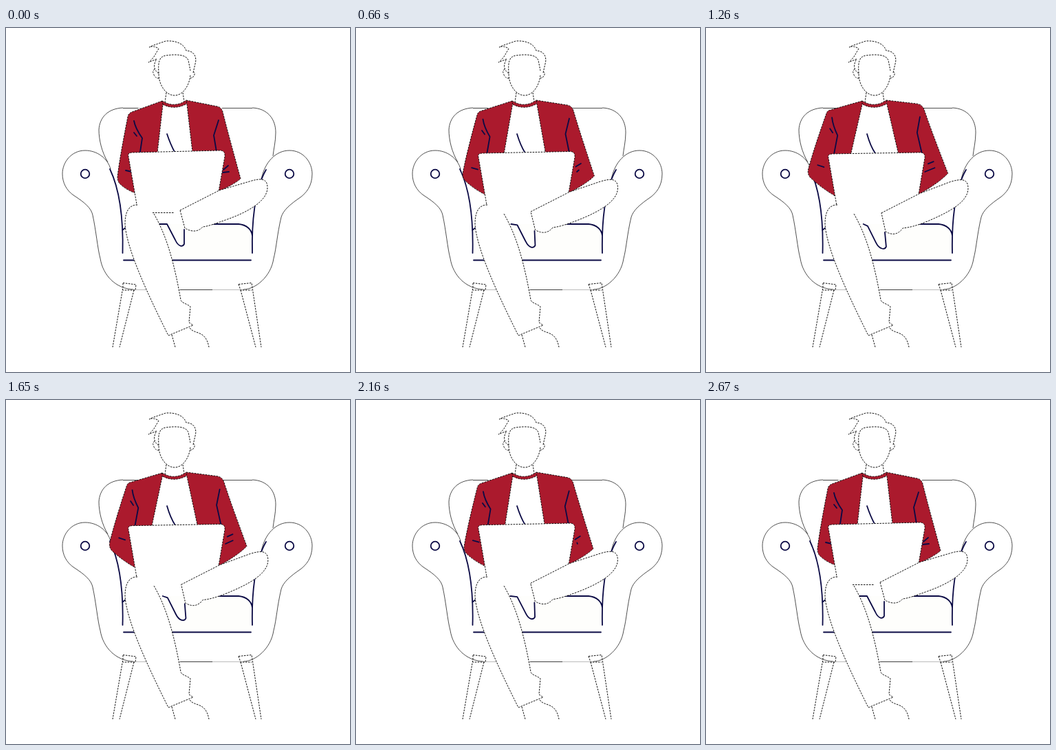
An HTML page that plays this animation: 500 by 500 pixels, repeating every 2.73 s.

```html
<!DOCTYPE html>
<html lang="en">
<head>
<meta charset="utf-8">
<title>Reading in an armchair</title>
<style>
  html, body { margin: 0; width: 100%; height: 100%; overflow: hidden; background: #fff; }
  svg { display: block; width: 100vw; height: 100vh; }
  path { fill: none; }
  .thin { stroke: #222; stroke-width: .8; }
  .faint { stroke: #aaa; stroke-width: .8; }
  .dots { stroke: #111; stroke-width: 1; stroke-dasharray: 2.5 1.5; }
  .navy { stroke: #0b0a45; stroke-width: 1.8; stroke-linecap: round; stroke-linejoin: round; }
  .white { fill: #fff; }
  .red { fill: #ab1a2d; }
  .seat { fill: #fefefc; }
</style>
</head>
<body>
<svg viewBox="0 0 500 500">
  <!-- chair -->
  <path class="thin" d="M148 195C139 180 135 162 135 148C136 130 148 117 170 116M358 116C380 117 392 132 392 152C392 165 389 176 388 186"/>
  <path class="faint" d="M170 116.5H200M185 380.5H345"/>
  <path class="thin" d="M170 116.5H192M314 116.5H358M253 380.5H300"/>
  <path class="thin white" d="M152 205C148 190 133 178 115 178C95 178 82 195 82 212C82 225 88 236 98 243C115 254 124 262 126 272C131 295 133 320 137 335C141 360 160 379 185 380"/>
  <path class="thin white" d="M371 220C376 195 392 178 412 178C432 178 445 195 445 212C445 230 436 240 428 246C412 257 403 265 400 275C394 300 393 320 389 335C385 362 362 380 345 380"/>
  <path class="seat" d="M170 294Q175 285 190 285H338Q355 287 358 302V337H170Z"/>
  <g fill="none" class="navy"><circle cx="115" cy="212" r="6.3"/><circle cx="412" cy="212" r="6.3"/></g>
  <path class="navy" d="M151 205C162 228 171 265 169.500 327M358 327C357 285 361 235 378 206M171 337.500H356M300 285H338C350 286 357 293 358 302M169 294L174 290"/>
  <path class="navy" d="M222 285L234 285L246 308C251 319 257 318 259 314L259 293" data-to="M229 285L235 288L247 312C252 322 260 323 262 318L260 297"/>
  <path class="dots" d="M170 370.500L189 373L188 381H170M170 371V377L155 464M186 381L165 464M338 372.500L357 370.500L358 377L371 464M338 372.500L341 381H357M341 381L363 464"/>

  <!-- head -->
  <path class="dots white" d="M233 94L231 108M257 94L259 107"/>
  <path class="dots" d="M222 67C222 82 232 98 245 98C258 98 267 82 268 68M222 66C221 50 222 42 232 40C246 38 262 38 265 47L268 62"/>
  <path class="dots" d="M222 66C214 61 214 53 219 45L207 50C215 44 217 38 222 30Q214 25 208 28C216 24 224 22 232 19C246 18 258 22 262 33C273 33 278 42 275 52L272 65M216 60Q212 62 215 68T223 73M272 63C276 65 274 72 268 73"/>

  <!-- shirt and jacket -->
  <path class="white" d="M228 110Q245 120 262 109L272 182H219Z" data-to="M228 110Q245 120 262 109L281 184H210Z"/>
  <path class="red" d="M227 106Q245 117 262 105L263 110Q245 120 227 111Z"/>
  <path class="dots" d="M227 106Q245 117 262 105M228 111Q245 120 263 110"/>
  <path class="red dots" d="M227 106L183 122Q178 124 177 129C173 150 165 190 162 217Q162 222 165 226Q174 235 188 240L192 185L220 181L228 111Z"
    data-to="M227 106L181 119Q176 120 175 124C167 146 155 180 148 206Q147 212 151 217Q168 233 189 245L192 187L210 184L227 111Z"/>
  <path class="red dots" d="M262 105L307 114Q313 115 315 122C322 150 333 190 341 219Q332 227 310 237L300 185L271 180L263 111Z"
    data-to="M262 105L307 110Q314 111 317 118C326 145 343 188 352 211Q339 225 309 242L300 187L280 183L263 111Z"/>
  <path class="navy" d="M234 154Q239 169 245 180" data-to="M234 154Q239 172 246 182"/>
  <path class="navy" d="M186 135Q188 146 198 160L195 180M186 152L190 157M174 207L183 209"
    data-to="M183 130Q184 141 191 156L186 182M180 146L184 152M162 199Q171 202 183 212"/>
  <path class="navy" d="M309 134L302 156L306 180M323 200L316 206M324 209L315 210"
    data-to="M311 129L307 152L314 182M331 194Q323 197 318 209M333 203L317 208"/>

  <!-- laptop -->
  <path class="white" d="M178 187Q176 181 184 181L311 178Q319 178 318 187L309 238L253 268H197Q192 267 191 262Z"
    data-to="M178 189Q176 183 184 183L311 181Q319 181 318 189L309 242L255 270H197Q192 269 191 264Z"/>
  <path class="dots" d="M197 268Q192 267 191 262L178 187Q176 181 184 181L311 178Q319 178 318 187L309 238"
    data-to="M197 269Q192 269 191 264L178 189Q176 183 184 183L311 181Q319 181 318 189L309 242"/>
  <path class="dots" id="base" d="M197 268.500H245"/>

  <!-- legs -->
  <path class="white" d="M190 257C178 257 173 268 173 285C175 320 205 385 236 447L272 432L266 428L268 405C262 400 255 400 254 395C245 345 235 305 215 270Z"/>
  <path class="dots" d="M191 257C178 257 173 268 173 285C175 320 205 385 236 447L272 432L266 428L268 405C262 400 255 400 254 395C245 345 235 305 215 270M241 446L246 464M267 436C274 446 290 438 295 464"/>
  <path class="white dots" d="M253 265L310 236L354 223C370 218 380 218 380 232C380 252 350 268 322 278C305 284 295 288 286 289Q276 300 260 291Z"
    data-to="M255 269L310 241L354 224C370 219 381 218 381 233C381 254 350 269 322 281C305 288 295 290 286 291Q276 305 261 296Z"/>
</svg>
<script>
const LOOP = 2730, STEP = 30, SWING = 2670;
const base = document.getElementById('base');
const numbers = /-?\d+(\.\d+)?/g;
const morphs = [...document.querySelectorAll('[data-to]')].map(path => ({
  path, from: path.getAttribute('d'), to: path.dataset.to.match(numbers).map(Number)
}));

// Rises and falls once, halfway between a sine and a straight ramp.
function spread(time) {
  const phase = Math.min(1, time / SWING);
  const ramp = 1 - Math.abs(2 * phase - 1);
  const wave = (1 - Math.cos(2 * Math.PI * phase)) / 2;
  return (ramp + wave) / 2;
}

function draw(now) {
  const amount = spread(Math.floor(now % LOOP / STEP) * STEP);
  for (const { path, from, to } of morphs) {
    let i = 0;
    path.setAttribute('d', from.replace(numbers, n => (+n + (to[i++] - n) * amount).toFixed(2)));
  }
  base.style.opacity = amount < .35 ? 1 : 0;
  requestAnimationFrame(draw);
}
draw(performance.now());
</script>
</body>
</html>
```
